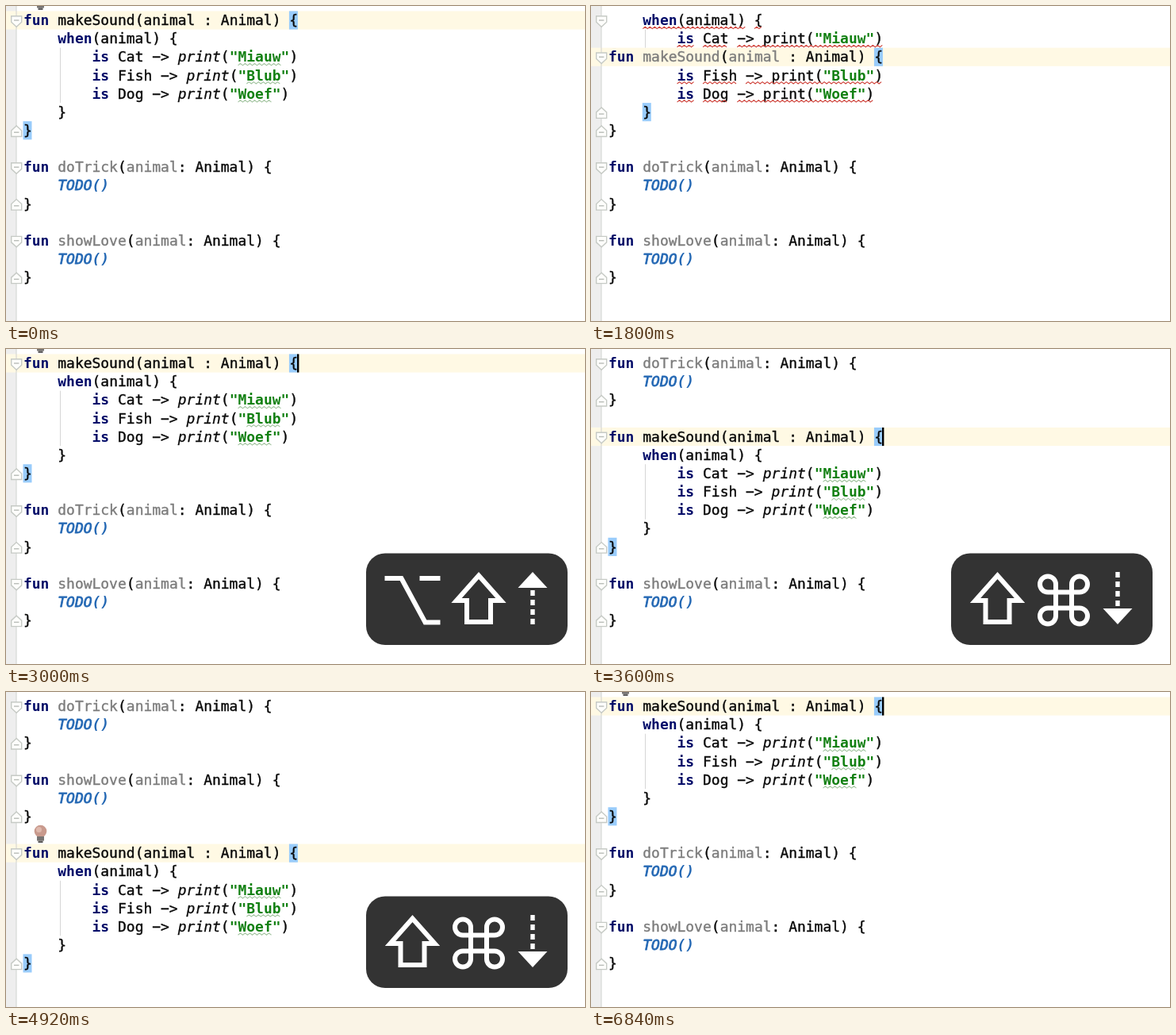
Write an HTML page with a canvas that moves like this. It is 730 by 397 pixels and loops after 6.96 s.

```html
<!DOCTYPE html>
<html lang="en">
<head>
<meta charset="utf-8">
<title>Moving code lines</title>
<style>
  html, body { margin: 0; width: 100%; height: 100%; overflow: hidden; background: #fff; }
  canvas { display: block; }
</style>
</head>
<body>
<canvas id="stage" width="730" height="397"></canvas>
<script>
const ctx = document.getElementById('stage').getContext('2d');
const LOOP = 6960, LEFT = 22, TOP = 6.4, ROW = 23.14, COL = 10.82;
const HOLD = 600, FADE = 240, BLINK = 480, BULB_DELAY = 360;
const MONO = '17.97px "DejaVu Sans Mono", "Liberation Mono", monospace';
const ERROR = '#cf4038', TYPO = '#a3c4a0';

// Font face, colour and extra weight
const STYLES = {
  text:    ['', '#0a0a0a', 0.4],
  keyword: ['bold ', '#000a68', 0],
  unused:  ['', '#7d7d7d', 0.4],
  call:    ['italic ', '#0a0a0a', 0.3],
  string:  ['bold ', '#128012', 0],
  todo:    ['italic ', '#2468b4', 0.8],
  todoEnd: ['italic bold ', '#2468b4', 0]
};

// Each key press: time, key symbols, layout that follows
const PRESSES = [
  [360,  ['option', 'shift', 'down'], 'line1'],
  [960,  ['option', 'shift', 'down'], 'line2'],
  [1920, ['option', 'shift', 'up'],   'line1'],
  [2640, ['option', 'shift', 'up'],   'top'],
  [3480, ['shift', 'command', 'down'], 'middle'],
  [4440, ['shift', 'command', 'down'], 'bottom'],
  [5400, ['shift', 'command', 'up'],   'middle'],
  [5880, ['shift', 'command', 'up'],   'top']
];

// Rows of the three functions, and how far the header has sunk into its body
const LAYOUTS = {
  top:    { sound: 0, trick: 8, love: 12, sunk: 0 },
  line1:  { sound: 0, trick: 8, love: 12, sunk: 1 },
  line2:  { sound: 0, trick: 8, love: 12, sunk: 2 },
  middle: { sound: 4, trick: 0, love: 12, sunk: 0 },
  bottom: { sound: 8, trick: 0, love: 4,  sunk: 0 }
};

const colX = col => LEFT + col * COL;
const rowY = row => TOP + row * ROW;

function rect(x, y, w, h, color) {
  ctx.fillStyle = color;
  ctx.fillRect(x, y, w, h);
}

function trace(points, closed) {
  ctx.beginPath();
  points.forEach(([x, y]) => ctx.lineTo(x, y));
  if (closed) ctx.closePath();
}

// parts alternate: style, text, style, text ...
function write(row, col, ...parts) {
  const y = rowY(row) + 17.8;
  ctx.lineJoin = 'round';
  for (let i = 0; i < parts.length; i += 2) {
    const [face, color, weight] = STYLES[parts[i]];
    ctx.font = face + MONO;
    ctx.fillStyle = ctx.strokeStyle = color;
    ctx.fillText(parts[i + 1], colX(col), y);
    if (weight) {
      ctx.lineWidth = weight;
      ctx.strokeText(parts[i + 1], colX(col), y);
    }
    col += parts[i + 1].length;
  }
  ctx.lineJoin = 'miter';
}

function wave(row, col, count, color) {
  const y = rowY(row) + 21;
  const end = colX(col + count);
  const points = [];
  for (let x = colX(col), i = 0; x <= end; x += 3, i++) points.push([x, y + (i % 2 ? -1.2 : 1.2)]);
  trace(points);
  ctx.strokeStyle = color;
  ctx.lineWidth = 1.1;
  ctx.stroke();
}

function fold(row, dir) {
  const y = rowY(row) + 12.8;
  trace([[-6.5, -6.5], [6.5, -6.5], [6.5, 1], [0, 7], [-6.5, 1]]
    .map(([dx, dy]) => [13.2 + dx, y + dy * dir]), true);
  ctx.fillStyle = '#fdfdfb';
  ctx.fill();
  ctx.strokeStyle = '#c6cac5';
  ctx.lineWidth = 1.4;
  ctx.stroke();
  rect(10, y - dir * 1.2 - 0.7, 6.4, 1.4, '#b9bdb8');
}

function braceBox(row, col) {
  rect(colX(col) - 0.5, rowY(row), 11, ROW, '#99ccfb');
}

function guide(row, count) {
  rect(68, rowY(row), 1, count * ROW, '#d6d6d6');
}

function stub(row, name) {
  write(row, 0, 'keyword', 'fun', 'unused', ' ' + name, 'text', '(', 'unused', 'animal', 'text', ': Animal) {');
  write(row + 1, 4, 'todo', 'TODO', 'todoEnd', '()');
  write(row + 2, 0, 'text', '}');
  fold(row, 1);
  fold(row + 2, -1);
}

function soundCase(row, animal, noise, broken) {
  const arrow = 12 + animal.length;
  const quote = arrow + 9;
  write(row, 8, 'keyword', 'is', 'text', ` ${animal} \u2212> `, broken ? 'text' : 'call', 'print',
    'text', '(', 'string', `"${noise}"`, 'text', ')');
  if (broken) {
    wave(row, 8, 2, ERROR);
    wave(row, 11, animal.length, ERROR);
    wave(row, arrow, quote + noise.length + 3 - arrow, ERROR);
  } else {
    wave(row, quote + 1, noise.length, TYPO);
  }
}

function soundBlock(row, sunk) {
  const broken = sunk > 0;
  const head = row + sunk;
  const rows = [0, 1, 2, 3, 4].filter(r => r !== sunk).map(r => r + row);
  const name = broken ? 'unused' : 'text';

  braceBox(head, 31);
  if (broken) braceBox(row + 5, 4);
  else braceBox(row + 6, 0);
  if (!broken) guide(row + 2, 3);
  else if (sunk === 2) guide(row + 1, 1);

  write(head, 0, 'keyword', 'fun', name, ' makeSound', 'text', '(', name, 'animal', 'text', ' : Animal) {');
  write(rows[0], 4, 'keyword', 'when', 'text', '(animal) {');
  if (broken) {
    wave(rows[0], 4, 12, ERROR);
    wave(rows[0], 17, 1, ERROR);
  }
  soundCase(rows[1], 'Cat', 'Miauw', broken);
  soundCase(rows[2], 'Fish', 'Blub', broken);
  soundCase(rows[3], 'Dog', 'Woef', broken);
  write(row + 5, 4, 'text', '}');
  write(row + 6, 0, 'text', '}');

  fold(head, 1);
  fold(row + 6, -1);
  if (broken) {
    fold(rows[0], 1);
    fold(row + 5, -1);
  }
}

function bulb(row) {
  const y = rowY(row) - 1.5;
  ctx.beginPath();
  ctx.arc(43.5, y - 14.5, 7.8, 0, Math.PI * 2);
  ctx.fillStyle = '#c99a8d';
  ctx.fill();
  ctx.beginPath();
  ctx.arc(41.5, y - 16.5, 3.5, 0, Math.PI * 2);
  ctx.fillStyle = '#dfb9ad';
  ctx.fill();
  rect(39, y - 8, 9, 5.5, '#777473');
  rect(40.5, y - 2.5, 6, 2.5, '#5c5a5a');
}

function line(points, closed) {
  trace(points, closed);
  ctx.stroke();
}

function dashedArrow(x, dir) {
  const y = 314;
  trace([[x, y - 33 * dir], [x + 18.5, y - 13 * dir], [x - 18.5, y - 13 * dir]], true);
  ctx.fill();
  for (let i = 0; i < 4; i++) {
    const start = y + dir * (-10 + i * 12);
    ctx.fillRect(x - 2.7, start, 5.4, dir * 7);
  }
}

// Symbols, drawn from the centre x of their slot
const SYMBOLS = {
  option(x) {
    line([[x - 35, 289], [x - 14, 289], [x + 16, 344.5], [x + 35, 344.5]]);
    line([[x + 9, 289], [x + 35, 289]]);
  },
  shift(x) {
    line([[x, 285.5], [x + 28, 317], [x + 15, 317], [x + 15, 344],
          [x - 15, 344], [x - 15, 317], [x - 28, 317]], true);
  },
  command(x) {
    const y = 316.5, a = 10, q = Math.PI / 2;
    ctx.strokeRect(x - a, y - a, a * 2, a * 2);
    [[1, 1, 2], [-1, 1, 3], [-1, -1, 0], [1, -1, 1]].forEach(([sx, sy, gap]) => {
      ctx.beginPath();
      ctx.moveTo(x + sx * a, y + sy * a);
      const start = (gap + 1) * q;
      ctx.arc(x + sx * a * 2, y + sy * a * 2, a, start, start + 3 * q);
      ctx.closePath();
      ctx.stroke();
    });
  },
  up(x) { dashedArrow(x, 1); },
  down(x) { dashedArrow(x, -1); }
};

function keyPanel(keys, alpha) {
  ctx.save();
  ctx.globalAlpha = alpha;
  ctx.fillStyle = '#333';
  ctx.beginPath();
  ctx.roundRect(454, 257.5, 254, 115.5, 24);
  ctx.fill();
  ctx.fillStyle = ctx.strokeStyle = '#fff';
  ctx.lineWidth = 6;
  keys.forEach((key, i) => SYMBOLS[key]([512.5, 596, 664][i]));
  ctx.restore();
}

function draw(time) {
  const press = PRESSES.filter(p => p[0] <= time).pop();
  const age = press ? time - press[0] : Infinity;
  const layout = LAYOUTS[press ? press[2] : 'top'];
  const active = layout.sound + layout.sunk;

  rect(0, 0, 730, 397, '#fff');
  rect(0, 0, 13, 397, '#eeeeee');
  rect(0, rowY(active), 730, ROW, '#fff9e4');
  rect(12.5, 0, 1, 397, '#cfd1cf');

  soundBlock(layout.sound, layout.sunk);
  stub(layout.trick, 'doTrick');
  stub(layout.love, 'showLove');

  if (!layout.sunk && age >= BULB_DELAY) bulb(active);
  if (press && Math.floor(age / BLINK) % 2 === 0) rect(367, rowY(active), 2.4, ROW, '#000');
  if (age < HOLD + FADE) keyPanel(press[1], Math.min(1, 1 - (age - HOLD) / FADE));
}

const begin = performance.now();
function tick() {
  draw((performance.now() - begin) % LOOP);
  requestAnimationFrame(tick);
}
tick();
</script>
</body>
</html>
```
